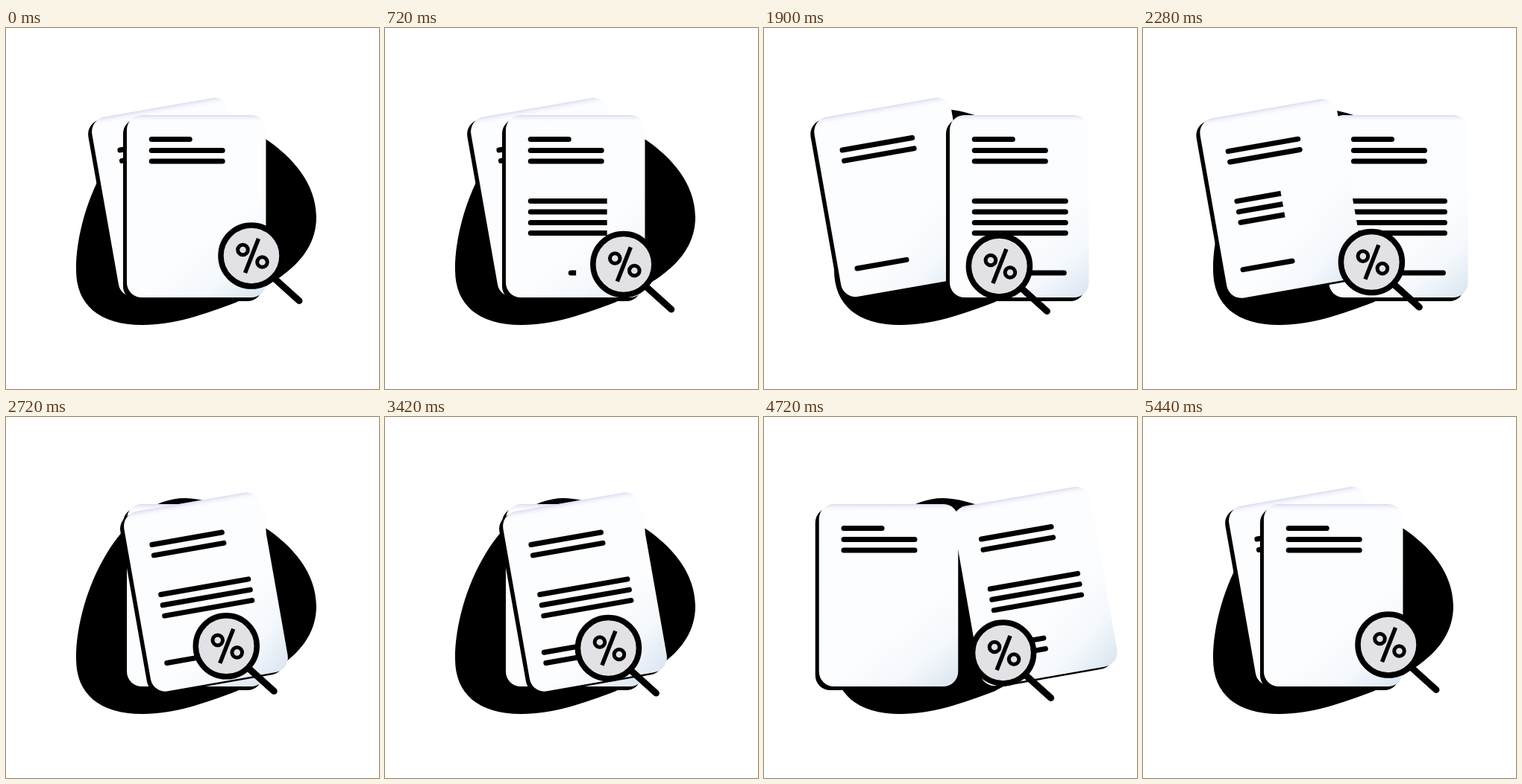
Recreate the animation shown at these times as an HTML page with a canvas. Size 500 by 485 pixels, loop 5.46 s.

```html
<!DOCTYPE html>
<html lang="en">
<head>
<meta charset="utf-8">
<title>Documents and magnifier</title>
<style>
  html, body { margin: 0; width: 100%; height: 100%; overflow: hidden; background: #fff; }
  canvas { display: block; width: 500px; height: 485px; }
</style>
</head>
<body>
<canvas id="stage" width="500" height="485"></canvas>
<script>
const ctx = document.getElementById('stage').getContext('2d');
const LOOP = 5460;
const W = 186.5, H = 245, R = 20;

const blob = new Path2D('M240 109C290 109 416 165 416 254C416 320 345 348 310 368' +
  'C265 385 225 399 183 399C125 399 94 372 94 325C94 235 155 109 240 109Z');
const sheet = new Path2D();
sheet.roundRect(-W / 2, -H / 2, W, H, R);

// Keys are [time, x, y]; every segment eases in and out.
const frontPath = [[1460, 255.2, 239.5], [2090, 366.2, 239.5], [2730, 255.2, 239.5],
  [3875, 255.2, 239.5], [4700, 166.7, 239.5], [5320, 255.2, 239.5]];
const tiltPath = [[1460, 225, 227.5], [2090, 164, 227.5], [2730, 268, 235],
  [3875, 268, 235], [4700, 364, 227.5], [5320, 225, 227.5]];
const lensPath = [[0, 329, 306], [1050, 317, 321], [1700, 317, 321],
  [2960, 293, 306.5], [4320, 317, 321.5], [5440, 329, 306]];

function ease(t, from, to) {
  const u = Math.min(1, Math.max(0, (t - from) / (to - from)));
  return u * u * (3 - 2 * u);
}

function along(keys, t) {
  let [, x, y] = keys[0];
  for (let i = 1; i < keys.length; i++) {
    const [t0, x0, y0] = keys[i - 1], [t1, x1, y1] = keys[i];
    const k = ease(t, t0, t1);
    x += (x1 - x0) * k;
    y += (y1 - y0) * k;
  }
  return [x, y];
}

function line(x0, y0, x1, y1, width, cap = 'round') {
  ctx.lineWidth = width;
  ctx.lineCap = cap;
  ctx.beginPath();
  ctx.moveTo(x0, y0);
  ctx.lineTo(x1, y1);
  ctx.stroke();
}

function rows(x0, x1, ys, shown = 1) {
  if (shown <= 0) return;
  ctx.save();
  if (shown < 1) {
    ctx.beginPath();
    ctx.rect(x0 - 4, -H / 2, (x1 - x0 + 8) * shown, H);
    ctx.clip();
  }
  for (const y of ys) line(x0, y, x1, y, 7);
  ctx.restore();
}

function gradient(x0, y0, x1, y1, ...stops) {
  const g = ctx.createLinearGradient(x0, y0, x1, y1);
  stops.forEach(([at, color]) => g.addColorStop(at, color));
  return g;
}

const paper = gradient(22, 36, 93, 122, [0, '#fcfdff'], [0.5, '#f4f8fc'], [1, '#d9e4f0']);
const topShade = gradient(0, -H / 2, 0, -H / 2 + 10,
  [0, 'rgba(196,194,228,.6)'], [0.35, 'rgba(222,222,244,.4)'], [1, 'rgba(252,253,255,0)']);

function drawSheet([x, y], angle, dx, dy, content) {
  ctx.save();
  ctx.translate(x, y);
  ctx.rotate(angle);
  ctx.translate(dx, dy);
  ctx.fillStyle = '#000';
  ctx.fill(sheet);
  ctx.translate(-dx, -dy);
  ctx.fillStyle = paper;
  ctx.fill(sheet);
  ctx.fillStyle = topShade;
  ctx.fill(sheet);
  content();
  ctx.restore();
}

function drawStraight(t) {
  const kept = t < 3500;
  drawSheet(along(frontPath, t), 0, -5, 5, () => {
    rows(-60, -9, [-90]);
    rows(-60, 35, [-75, -60.5]);
    rows(-60, 62, [-7, 7.5, 22, 36], kept ? ease(t, 80, 960) : 0);
    rows(-6, 60, [89.5], kept ? ease(t, 600, 1100) : 0);
  });
}

function drawTilted(t) {
  const kept = t < 5400;
  drawSheet(along(tiltPath, t), -Math.PI / 18, -5.5, 2.5, () => {
    rows(-60, 35, [-75, -60.5]);
    rows(-60, 59, [-7, 7.5, 22], kept ? ease(t, 2000, 2560) : 0);
    rows(-68, -1, [70.5], kept ? ease(t, 2880, 3450) : 0);
    rows(-68, -1, [85]);
  });
}

function ring(x, y, r, width) {
  ctx.lineWidth = width;
  ctx.beginPath();
  ctx.arc(x, y, r, 0, Math.PI * 2);
  ctx.stroke();
}

function drawLens(t) {
  const [x, y] = along(lensPath, t);
  ctx.save();
  ctx.translate(x, y);
  line(28, 28, 64, 60.5, 9);
  ctx.fillStyle = '#e2e2e6';
  ctx.beginPath();
  ctx.arc(0, 0, 41, 0, Math.PI * 2);
  ctx.fill();
  ring(0, 0, 41, 7.5);
  line(-8.5, 23, 9.5, -23, 5.5, 'butt');
  ring(-11.5, -8, 6.8, 5);
  ring(14.5, 8.5, 6.8, 5);
  ctx.restore();
}

function draw(t) {
  ctx.fillStyle = '#fff';
  ctx.fillRect(0, 0, 500, 485);
  ctx.fillStyle = ctx.strokeStyle = '#000';
  ctx.fill(blob);
  const layers = [drawTilted, drawStraight];
  if (t >= 2090 && t < 4700) layers.reverse();
  layers.forEach(layer => layer(t));
  drawLens(t);
}

const start = performance.now();
function tick() {
  draw((performance.now() - start) % LOOP);
  requestAnimationFrame(tick);
}
tick();
</script>
</body>
</html>
```
